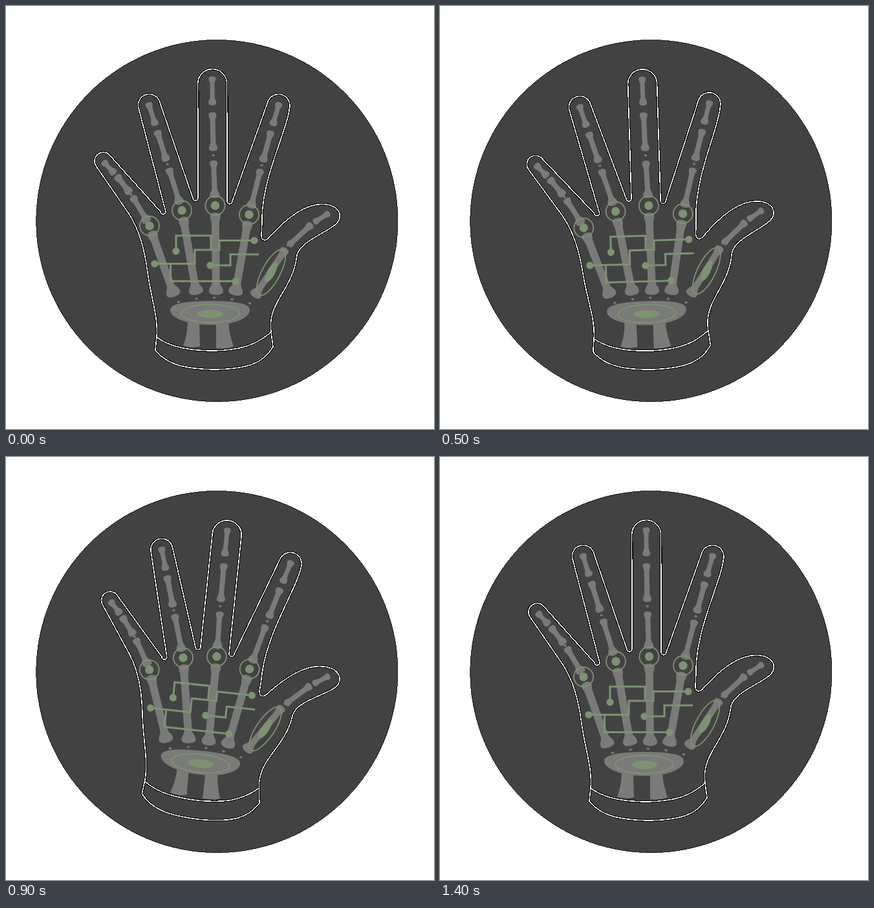
These frames come from a looping animation (662x654 px, 1500 ms). An HTML page:

```html
<!DOCTYPE html>
<html lang="en">
<head>
<meta charset="utf-8">
<title>Waving hand scan</title>
<style>
  html, body { margin: 0; width: 100%; height: 100%; overflow: hidden; background: #fff; }
  svg { display: block; width: 662px; height: 654px; }
  .skin { fill: none; stroke-linejoin: round; shape-rendering: crispEdges; }
  .dark { stroke: #000; stroke-width: 3.6; }
  .light { stroke: #fff; stroke-width: 1.5; }
  .bone { fill: #7a7a79; }
  .trace { fill: none; stroke: #7d9370; stroke-width: 3; marker-start: url(#end); }
  .both { marker-end: url(#end); }
  .ring { fill: none; stroke: #7d9370; stroke-width: 1.8; }
  .node { fill: #7d9370; }
</style>
</head>
<body>
<svg viewBox="0 0 662 654">
  <defs>
    <marker id="end" markerUnits="userSpaceOnUse" overflow="visible"><circle r="5.6" class="node"/></marker>
    <g id="outline">
      <path id="glove"/>
      <path d="M233 512 C255 528 285 533 322 533 C360 532 385 526 410 504 L413 527
        C398 552 376 561 322 562 C280 561 250 556 231 532 Z"/>
    </g>
  </defs>
  <circle cx="326.4" cy="332.1" r="279.6" fill="#424242" stroke="#000" stroke-width=".8" shape-rendering="crispEdges"/>
  <g id="hand">
    <use href="#outline" class="skin dark"/>
    <use href="#outline" class="skin light"/>
    <g id="bones" class="bone">
      <path d="M254 470 C254 460 280 456 316 456 C352 456 377 459 377 470
        C377 483 350 494 316 493 C280 493 254 482 254 470 Z"/>
      <path d="M281 487 H299 L300 526 Q288 530 274 525 Q281 508 281 487 Z"/>
      <path d="M325 487 H344 Q345 508 352 526 Q340 531 325 529 Z"/>
    </g>
    <path class="trace" d="M263 379 V355 H317 V377"/>
    <path class="trace both" d="M230 398.500 H292 V377 H330 V362.500 H384"/>
    <path class="trace" d="M316 401 H347 V384 H391"/>
    <path class="trace" d="M355 425.500 H254.500 V398"/>
    <g id="nodes"></g>
    <ellipse class="ring" cx="316" cy="475.500" rx="45" ry="14"/>
    <ellipse class="node" cx="316" cy="476" rx="20" ry="6.500"/>
    <g transform="translate(410 412) rotate(28)">
      <ellipse class="ring" rx="14" ry="39.500"/>
      <ellipse class="node" rx="6" ry="17"/>
    </g>
  </g>
</svg>
<script>
const $ = id => document.getElementById(id);
const bones = $('bones'), nodes = $('nodes'), hand = $('hand');

function add(parent, tag, attrs) {
  const el = document.createElementNS('http://www.w3.org/2000/svg', tag);
  for (const k in attrs) el.setAttribute(k, attrs[k]);
  parent.appendChild(el);
}

const speck = (cx, cy) => add(bones, 'ellipse', { cx, cy, rx: 2.3, ry: 1.7 });

// Shaft of width w between two points, flared to half-widths a and b.
function bone([x, y], [x2, y2], w = 8, a = 6, b = 6.5) {
  const len = Math.hypot(x2 - x, y2 - y);
  const turn = Math.atan2(y2 - y, x2 - x) * 180 / Math.PI - 90;
  const h = w / 2, p = a * .8, q = 2 + b * .5;
  const d = `M${-a} 0 C${-a} ${-p} ${a} ${-p} ${a} 0 C${a} ${p} ${h} ${p} ${h} ${p * 2}
    L${h} ${len - q * 2} C${h} ${len - q} ${b} ${len - q} ${b} ${len}
    C${b} ${len + q} ${-b} ${len + q} ${-b} ${len}
    C${-b} ${len - q} ${-h} ${len - q} ${-h} ${len - q * 2}
    L${-h} ${p * 2} C${-h} ${p} ${-a} ${p} ${-a} 0 Z`;
  add(bones, 'path', { d, transform: `translate(${x} ${y}) rotate(${turn})` });
}

// Point at share t of the way from a to b, bowed sideways.
function along([x, y], [x2, y2], bend, t) {
  const len = Math.hypot(x2 - x, y2 - y), off = 4 * t * (1 - t) * bend / len;
  return [x + (x2 - x) * t + (y2 - y) * off, y + (y2 - y) * t - (x2 - x) * off];
}

// tip, knuckle, base of the palm bone, fingertip radius, stretch, bow, gap to the next finger
const fingers = [
  { tip: [152, 242], joint: [222, 340], base: [259, 444], r: 13.5, reach: .95, bend: 5, gap: [243, 322] },
  { tip: [221, 152], joint: [272, 316], base: [294, 441], r: 17, reach: 1, bend: 0, gap: [293, 301] },
  { tip: [319, 112], joint: [323.5, 308.5], base: [325, 441], r: 22.5, reach: 1.07, bend: -1, gap: [346, 306] },
  { tip: [422, 152], joint: [376, 322.5], base: [355, 442], r: 17.5, reach: .98, bend: -1 }
];

let glove = 'M233 512 C236 482 224 450 219 412 C214 374 206 346 190 321';

for (const { tip, joint, base, r, reach, bend, gap } of fingers) {
  const at = t => along(tip, joint, bend, t * reach);
  bone(tip, at(.18), 7, 5.5, 6);
  bone(at(.265), at(.515));
  speck(...at(.565));
  bone(at(.62), along(tip, joint, bend, .92), 8, 6, 7.5);
  bone(along(joint, base, 0, .12), base, 12, 8, 11);

  const [x, y] = joint;
  add(nodes, 'circle', { cx: x, cy: y, r: 15, class: 'ring' });
  add(nodes, 'circle', { cx: x, cy: y, r: 6.7, class: 'node' });

  const len = Math.hypot(x - tip[0], y - tip[1]);
  const ux = (x - tip[0]) / len, uy = (y - tip[1]) / len, sink = r * 1.2 - 19;
  const cx = tip[0] + ux * sink, cy = tip[1] + uy * sink;
  glove += `L${cx - uy * r} ${cy + ux * r} A${r} ${r} 0 0 1 ${cx + uy * r} ${cy - ux * r}`;
  if (gap) glove += `L${gap[0] - 4} ${gap[1] - 4} a4 4 0 0 0 8 0`;
}

$('glove').setAttribute('d', glove + `C436 190 398 260 396 326 Q396 340 395 354
  C395 363 401 364 406 359 C436 325 470 300 501 308 C514 312 519 321 515 331
  C508 347 456 361 450 385 C444 440 404 456 410 504`);

const thumb = t => along([498, 321], [431, 378], -4, t);
bone(thumb(0), thumb(.26), 7, 5, 5);
bone(thumb(.37), thumb(.86), 8, 6, 5.5);
speck(436, 370);
bone(thumb(1), [386, 446], 10, 7, 9);

for (let x = 267; x < 380; x += 27.5) speck(x, 451 + (x - 318) ** 2 / 400);

// Swing in degrees, keyed on steps of 100 ms.
const keys = [[0, 0], [3.25, -5], [10, 8], [14, 0]];

function swing(s) {
  const i = keys.findIndex((k, n) => n && s <= k[0]);
  const [s0, a0] = keys[i - 1], [s1, a1] = keys[i];
  return a0 + (a1 - a0) * (s - s0) / (s1 - s0);
}

function draw() {
  const step = Math.floor(performance.now() % 1500 / 100);
  hand.setAttribute('transform', `rotate(${swing(step)} 326 332)`);
  requestAnimationFrame(draw);
}
draw();
</script>
</body>
</html>
```
